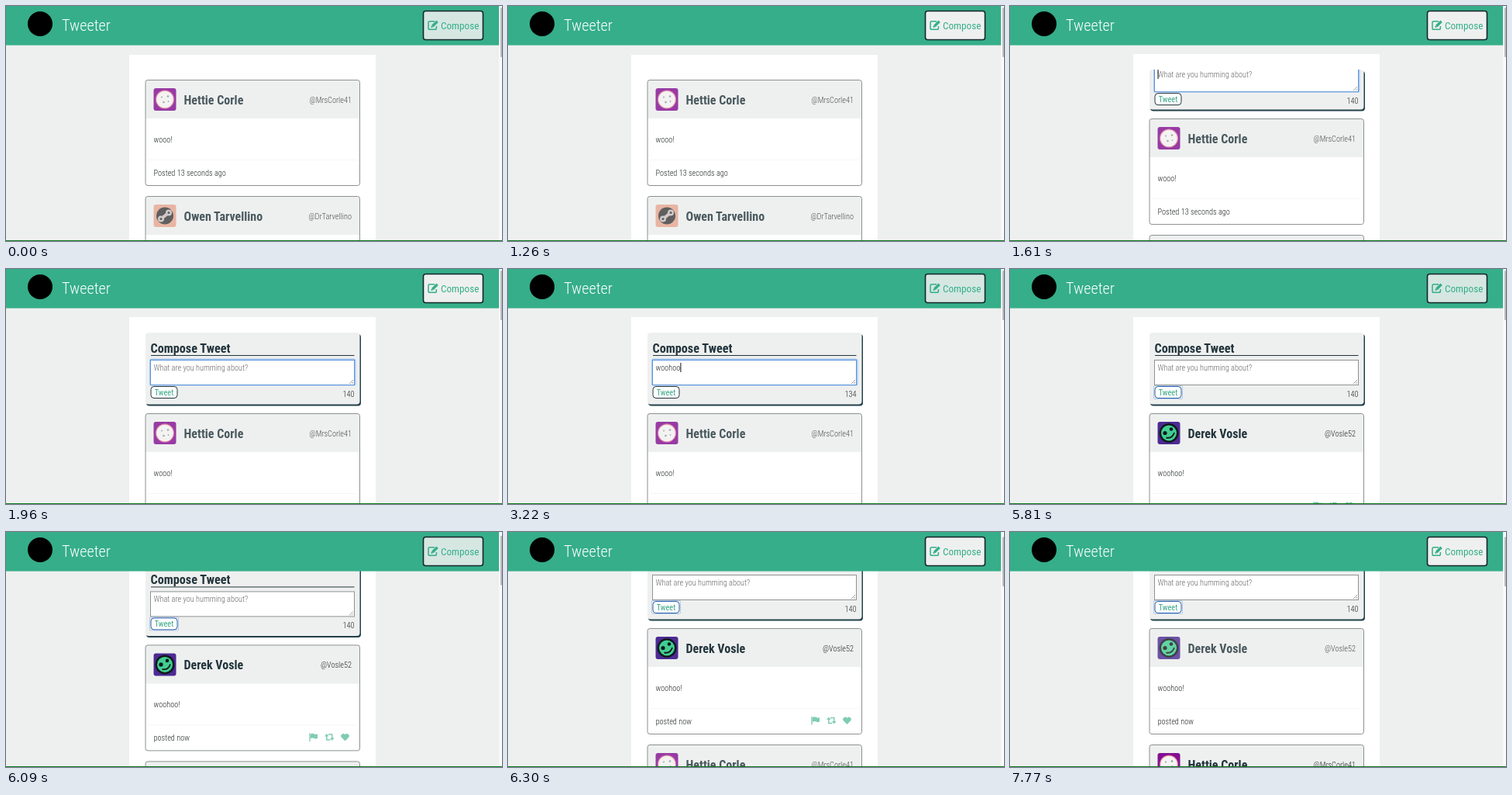
An HTML page that plays this animation: 640x303 px, repeating every 7.84 s.

```html
<!DOCTYPE html>
<html lang="en">
<head>
<meta charset="utf-8">
<title>Tweeter</title>
<style>
html, body { margin: 0; width: 100%; height: 100%; overflow: hidden; background: #eef0ef; }
svg { display: block; width: 640px; height: 303px; }
text { font: 300 10.3px 'Roboto Condensed', Roboto, sans-serif; font-stretch: 75%; fill: #24282a; }
.bold { font-size: 16.2px; font-weight: 700; fill: #22343c; }
.logo { font-size: 20.2px; fill: #fff; }
.compose { font-size: 13.2px; font-weight: 400; fill: #35ae89; }
.end { text-anchor: end; }
.mid { text-anchor: middle; font-weight: 400; fill: #35a584; }
.hint { fill: #666; }
.name { font-size: 16px; }
</style>
</head>
<body>
<svg viewBox="0 0 640 303" xmlns="http://www.w3.org/2000/svg">
  <defs>
    <clipPath id="slot"><rect id="slotBox" x="178" y="83" width="280" height="0"/></clipPath>
  </defs>
  <rect width="640" height="303" fill="#eef0ef"/>
  <g id="page">
    <rect x="159" y="63" width="318" height="600" fill="#fff"/>
    <g id="form">
      <rect id="shade" x="181" y="85" width="277" rx="4" fill="#22404a"/>
      <rect id="box" x="180" y="83" width="276.5" rx="4" fill="#eef0ef"/>
      <g clip-path="url(#slot)">
        <g id="fields">
          <text class="bold" x="186.5" y="108.500">Compose Tweet</text>
          <path d="M187 112.500H449.500" stroke="#22343c"/>
          <rect id="areaGlow" x="186" y="117.500" width="264.500" height="33" rx="1.500" fill="none" stroke="#a9c8ee" stroke-width="2"/>
          <rect id="area" x="186.500" y="118.500" width="263" height="32" fill="#fff"/>
          <path d="M443 149l5-5M446 149l2-2" stroke="#888" stroke-width=".8"/>
          <text id="typed" x="190.500" y="131.500"></text>
          <path id="caret" stroke="#111" stroke-width="1"/>
          <rect id="btnGlow" x="185.500" y="151.500" width="37" height="17" rx="1" fill="none" stroke="#7fa6dc" stroke-dasharray="1 1"/>
          <rect id="btn" x="187" y="152.500" width="34" height="15" rx="4" fill="#fff"/>
          <text class="mid" x="204" y="163.500">Tweet</text>
          <text id="count" class="end" x="449.500" y="165.500"></text>
        </g>
      </g>
    </g>
    <g id="list"></g>
  </g>
  <rect width="636.300" height="50.600" fill="#35ae89"/>
  <circle cx="44" cy="23" r="16" fill="#000"/>
  <text class="logo" x="72" y="32">Tweeter</text>
  <rect id="compose" x="538.500" y="6.500" width="77" height="37" rx="3" fill="#eef0ef" stroke="#14262a" stroke-width="1.600"/>
  <g fill="none" stroke="#35ae89">
    <path d="M553 19.800H546.800Q545 19.800 545 21.600V28.400Q545 30.200 546.800 30.200H553.600Q555.400 30.200 555.400 28.400V26" stroke-width="1.500"/>
    <path d="M550.300 26L556.600 19.700" stroke-width="3.400"/>
    <path d="M548.800 27.500l1.500-1.500" stroke-width="1.800"/>
  </g>
  <text class="compose" x="561" y="29.500">Compose</text>
  <rect x="636.300" width="3.700" height="303" fill="#fafafa"/>
  <rect id="thumb" x="638" width="2" y="2" height="64" rx="1" fill="#b9b9b9"/>
  <rect y="302" width="640" height="1" fill="#0c7a1c"/>
</svg>
<script>
const LOOP = 7840, STEP = 70, FORM = 92, SCROLL = 62;
const OPEN = 1396, POST = 4760, WORD = 'woohoo!';
const KEYS = [2380, 2520, 2660, 2870, 3010, 3150, 3490];
const $ = id => document.getElementById(id);
const set = (el, attrs) => { for (const k in attrs) el.setAttribute(k, attrs[k]); };
const clamp = x => Math.max(0, Math.min(1, x));
const ramp = (t, from, to) => clamp((t - from) / (to - from));
const swing = p => .5 - Math.cos(p * Math.PI) / 2;

const faces = {
  moon: `<rect width="29" height="29" rx="3" fill="#820f92"/>
    <circle cx="14.500" cy="14.500" r="12" fill="#e0729a"/>
    <circle cx="14.500" cy="14.500" r="10.800" fill="#f6f4f2"/>
    <g fill="#8a9bab"><circle cx="10.500" cy="11.500" r="1"/><circle cx="18.500" cy="10.500" r="1.300"/>
    <circle cx="13" cy="18" r="1.300"/><circle cx="19" cy="17" r=".9"/></g>`,
  bone: `<rect width="29" height="29" rx="3" fill="#e7a791"/>
    <circle cx="14.500" cy="14.500" r="11" fill="#3d3a3c"/>
    <path d="M9 19L20 10" stroke="#c9c1bf" stroke-width="4"/>
    <g fill="#c9c1bf"><circle cx="9.500" cy="18.500" r="4"/><circle cx="19.500" cy="10.500" r="4"/></g>
    <g fill="#3d3a3c"><circle cx="9.500" cy="18.500" r="1.500"/><circle cx="19.500" cy="10.500" r="1.500"/></g>`,
  grin: `<rect width="29" height="29" rx="3" fill="#4c2a94"/>
    <circle cx="14.500" cy="14.500" r="12.500" fill="#10191b"/>
    <circle cx="14.500" cy="14.500" r="10" fill="#41cd92"/>
    <g fill="#10191b"><circle cx="9.500" cy="14.500" r="2.600"/><circle cx="17.500" cy="9.500" r="2.300"/></g>
    <path d="M11 20.500Q19 22 21.500 14" fill="none" stroke="#10191b" stroke-width="1.800"/>`
};

const icons = `<path d="M392 239V249.500" stroke="#7fccb3" stroke-width="1.400"/>
  <g fill="#7fccb3"><path d="M393 240Q395.500 238.500 398 240T402 239.700V245.500Q400 246.800 397.500 245.500T393 246Z"/>
  <path d="M437.500 249L432.800 244.300A2.900 2.900 0 0 1 437.500 240.900A2.900 2.900 0 0 1 442.200 244.300Z"/>
  <path d="M411 243l2.800-3.500 2.800 3.500zM418 245l2.800 3.500 2.800-3.500z"/></g>
  <path d="M413.800 242V247.500H418.500M416 240.500H420.800V245.500" fill="none" stroke="#7fccb3" stroke-width="1.500"/>`;

function addTweet(name, handle, face, body, age) {
  const g = document.createElementNS('http://www.w3.org/2000/svg', 'g');
  g.innerHTML = `<rect x="180" y="95.500" width="276.500" height="136" rx="3" fill="#fff"/>
    <path d="M180 145V98.500Q180 95.500 183 95.500H453.500Q456.500 95.500 456.500 98.500V145Z" fill="#eef0ef"/>
    <g class="head"><g transform="translate(190.500 106)">${faces[face]}</g>
    <text class="bold name" x="229.500" y="126.500">${name}</text>
    <text class="end" x="446" y="124.500">${handle}</text></g>
    <text x="190.500" y="175.500">${body}</text>
    <path d="M184 198.500H452" stroke="#f4f5f5"/>
    <text x="190.500" y="218.500">${age}</text>
    <g class="icons" transform="translate(0 -30)">${icons}</g>
    <rect x="180" y="95.500" width="276.500" height="136" rx="3" fill="none" stroke="#8b9092"/>`;
  $('list').append(g);
  const head = g.querySelector('.head'), tools = g.querySelector('.icons');
  return (y, hover) => {
    set(g, { transform: `translate(0 ${y})` });
    set(head, { opacity: .8 + .2 * hover });
    set(tools, { opacity: hover });
  };
}

const newest = addTweet('Derek Vosle', '@Vosle52', 'grin', 'woohoo!', 'posted now');
const first = addTweet('Hettie Corle', '@MrsCorle41', 'moon', 'wooo!', 'Posted 13 seconds ago');
const second = addTweet('Owen Tarvellino', '@DrTarvellino', 'bone', 'hello there', 'Posted 2 minutes ago');

function drawForm(t, open) {
  const posted = t >= POST, focus = t >= OPEN && !posted;
  const done = KEYS.filter(k => k <= t), n = posted ? 0 : done.length;
  set($('form'), { visibility: open > 0 ? 'visible' : 'hidden' });
  set($('shade'), { height: open + .5 });
  set($('box'), { height: open + .5 });
  set($('slotBox'), { height: open + .5 });
  // the focused field keeps itself in view while the panel grows
  set($('fields'), { transform: `translate(0 ${(open - FORM) * .95})` });
  set($('areaGlow'), { opacity: +focus });
  set($('area'), { stroke: focus ? '#5a94dc' : '#8f9293' });
  set($('btnGlow'), { opacity: +posted });
  set($('btn'), { stroke: posted ? '#2d5fae' : '#22343c' });

  const typed = $('typed');
  typed.textContent = n ? WORD.slice(0, n) : 'What are you humming about?';
  typed.setAttribute('class', n ? '' : 'hint');
  $('count').textContent = 140 - n;
  const x = 191 + (n ? typed.getComputedTextLength() : 0);
  const since = t - (done.length ? done[done.length - 1] : OPEN);
  set($('caret'), { d: `M${x} 122V134`, opacity: +(focus && since % 1000 < 500) });
}

function draw(t) {
  const open = FORM * swing(ramp(t, OPEN, OPEN + 400));
  const nudge = open > 0 ? 1 : 0;
  const scroll = nudge + SCROLL * swing(ramp(t, 5880, 6230));
  const posted = t >= POST, leave = ramp(t, 7350, 7600);
  drawForm(t, open);
  newest(posted ? open : 900, 1 - leave);
  first(open + (posted ? 150 : 0), posted ? leave : 0);
  second(open + (posted ? 300 : 150), 0);
  set($('page'), { transform: `translate(0 ${-scroll})` });
  set($('thumb'), { y: 2 + scroll / 15 });
  const hover = ramp(t, 350, 630) - ramp(t, 2100, 2380) + ramp(t, 6160, 6300);
  set($('compose'), { 'fill-opacity': .87 + .13 * hover });
}

const begin = performance.now();
function tick() {
  const t = (performance.now() - begin) % LOOP;
  draw(Math.floor(t / STEP) * STEP);
  requestAnimationFrame(tick);
}
tick();
</script>
</body>
</html>
```
